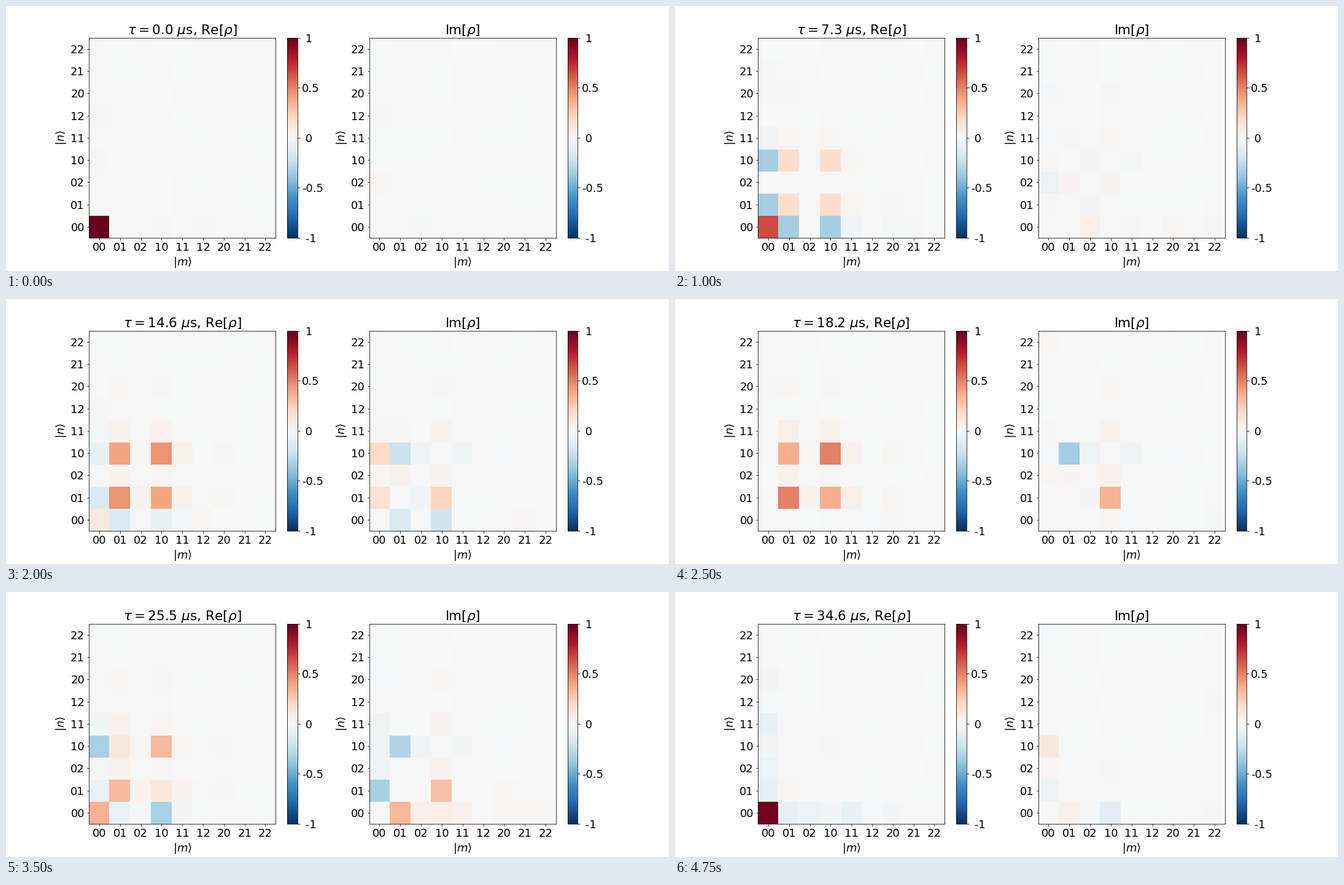
A matplotlib script for the animation above (5 s loop, 1080 by 432 pixels).

```python
import numpy as np
import matplotlib.pyplot as plt
from matplotlib.animation import FuncAnimation
from matplotlib.transforms import Affine2D

FRAMES, INTERVAL = 20, 250
TAU_STEP = 1.8227  # microseconds per frame
STATES = ["00", "01", "02", "10", "11", "12", "20", "21", "22"]
N = len(STATES)

plt.rcParams.update({"font.family": "DejaVu Sans", "font.size": 18,
                     "mathtext.fontset": "dejavusans"})


def amplitude(size, phase, drift, frame):
    """Complex amplitude whose phase, in degrees, falls linearly."""
    return size * np.exp(1j * np.radians(phase - drift * frame))


def wave_function(frame):
    """Rabi cycle from 00 into 01 and 10, with weak leakage."""
    angle = np.pi * frame / FRAMES
    shared = np.sin(angle) / np.sqrt(2)
    leak = 1 - np.exp(-frame / 2)
    psi = np.zeros(N, complex)
    psi[STATES.index("00")] = np.cos(angle)
    psi[STATES.index("01")] = amplitude(shared, 219, 10, frame)
    psi[STATES.index("10")] = amplitude(shared, 242, 16.6, frame)
    psi[STATES.index("02")] = amplitude(.07 * leak, 330, 18, frame)
    psi[STATES.index("11")] = amplitude(.07 * leak, 275, 15, frame)
    psi[STATES.index("20")] = amplitude(.03 * leak, 275, 15, frame)
    return psi


def density(frame):
    """Pure-state density matrix with weak Hermitian noise."""
    rng = np.random.default_rng(40 + frame)
    level = np.full((N, N), .003)
    level[:, 0] = .008
    re, im = rng.normal(size=(2, N, N)) * level
    lower = np.tril(re + 1j * im, -1)
    psi = wave_function(frame)
    return np.outer(psi, psi.conj()) + lower + lower.conj().T


def panel(ax):
    mesh = ax.pcolormesh(np.zeros((N, N)), cmap="RdBu_r", vmin=-1, vmax=1)
    # Half a pixel back, so that cell edges round down to whole pixels.
    mesh.set_transform(ax.transData + Affine2D().translate(-.5, -.5))
    centres = np.arange(N) + .5
    ax.set(xlim=(0, N), ylim=(0, N))
    ax.set_xticks(centres, STATES)
    ax.set_yticks(centres, STATES)
    ax.set_xlabel(r"$|m\rangle$")
    ax.set_ylabel(r"$|n\rangle$")
    bar = fig.colorbar(mesh, ax=ax, ticks=[-1, -.5, 0, .5, 1])
    bar.ax.set_yticklabels([" -1", "-0.5", " 0", "0.5", " 1"])
    return mesh


fig, axes = plt.subplots(1, 2, figsize=(15, 6), dpi=72)
fig.subplots_adjust(left=.125, right=.9, bottom=.125, top=.88, wspace=.2)
real, imag = [panel(ax) for ax in axes]
title = axes[0].set_title("")
axes[1].set_title(r"Im[$\rho$]")


def update(frame):
    rho = density(frame)
    real.set_array(rho.real)
    imag.set_array(rho.imag)
    title.set_text(rf"$\tau = {TAU_STEP * frame:.1f}\ \mu$s, Re[$\rho$]")
    return real, imag, title


anim = FuncAnimation(fig, update, frames=FRAMES, interval=INTERVAL,
                     repeat=True, repeat_delay=0, blit=False)
plt.show()
```
